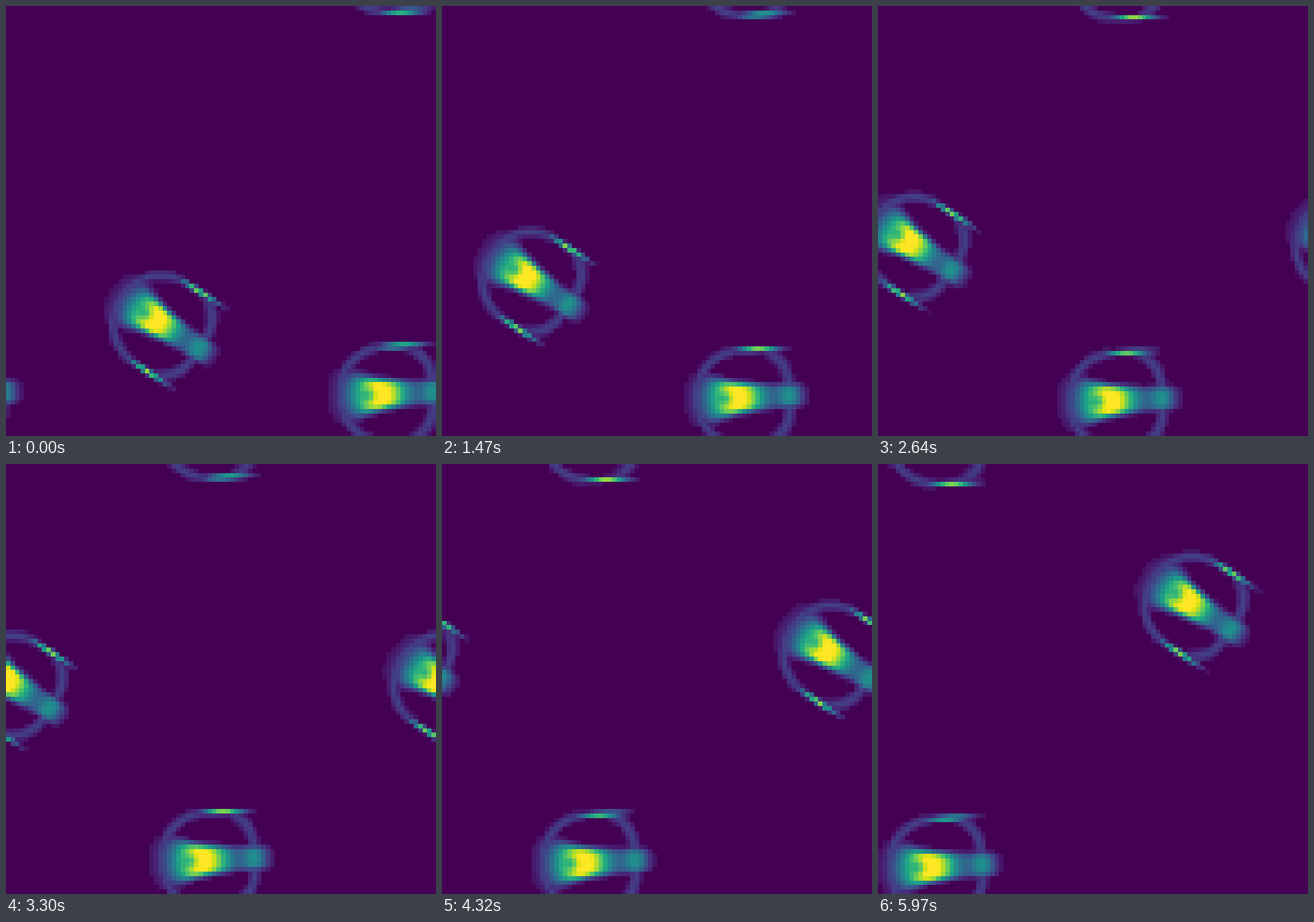
Recreate the animation shown at these times as a matplotlib script. Size 748 by 748 pixels, loop 6000 ms.

```python
import numpy as np
import matplotlib.pyplot as plt
from matplotlib.animation import FuncAnimation

SIZE, DPI = 748, 100
N = 96                      # cells per side, edges wrap around
FRAMES, INTERVAL = 200, 30

# Start position and velocity of each glider, in cells and cells per step
GLIDERS = [
    ((34.05, 70.50), (-0.3035, -0.1985)),
    ((84.40, 86.70), (-0.3618, 0.0160)),
]

cells = np.arange(N) + 0.5
X, Y = np.meshgrid(cells, cells)


def bell(x, width):
    return np.exp(-0.5 * (x / width) ** 2)


def wrap(d):
    return (d + N / 2) % N - N / 2


# In the shapes below u runs forward along the body, v is the distance sideways

def body(u, v):
    """Bright core with a notch in front, fanning into the head, and a tail."""
    fan = np.clip(u / 9, 0, 1)
    bent = u + 0.04 * v ** 2 * fan
    spine = 1.1 * bell(bent - 0.9, 4.7) + 0.46 * bell(u + 11, 2.05)
    notch = 0.29 * bell(u - 3.3, 1.2) * bell(v, 1.15)
    edge = (v - 2.3 - 0.8 * np.exp(u / 6)) / (0.4 + 0.9 * fan ** 2)
    return (spine - notch) / (1 + np.exp(np.clip(edge, -40, 40)))


def ring(u, v):
    """Faint membrane, round in front and squarer behind."""
    front = np.hypot(u / 10, v / 10.5)
    rear = np.cbrt(np.abs(u / 10.9) ** 3 + (v / 10.5) ** 3)
    dist = (np.where(u > 0, front, rear) - 1) * 10.5
    gap = np.exp(-((u + 3) / 3) ** 2) * (v > 8)
    return 0.19 * (1 - gap) * bell(dist, 0.82)


def wing(u, v):
    """Thin bright streak on either side."""
    path = 10.65 - 0.02 * np.maximum(u + 1, 0) ** 2
    return 0.85 * bell(u + 4, 3.3) * bell(v - path, 0.42)


def glider(step, start, vel):
    dx = wrap(X - start[0] - vel[0] * step)
    dy = wrap(Y - start[1] - vel[1] * step)
    fx, fy = np.array(vel) / np.hypot(*vel)
    u = dx * fx + dy * fy
    v = np.abs(dy * fx - dx * fy)
    return np.maximum.reduce([body(u, v), ring(u, v), wing(u, v)])


def world(step):
    field = np.maximum.reduce([glider(step, *g) for g in GLIDERS])
    return np.where(field < 0.045, 0, np.clip(field, 0, 1))


fig = plt.figure(figsize=(SIZE / DPI, SIZE / DPI), dpi=DPI)
ax = fig.add_axes([0, 0, 1, 1])
ax.axis("off")
image = ax.imshow(world(0), cmap="viridis", vmin=0, vmax=1,
                  interpolation="nearest", aspect="auto")


def update(step):
    image.set_data(world(step))
    return [image]


anim = FuncAnimation(fig, update, frames=FRAMES, interval=INTERVAL,
                     repeat=True, repeat_delay=0, blit=False)
plt.show()
```
